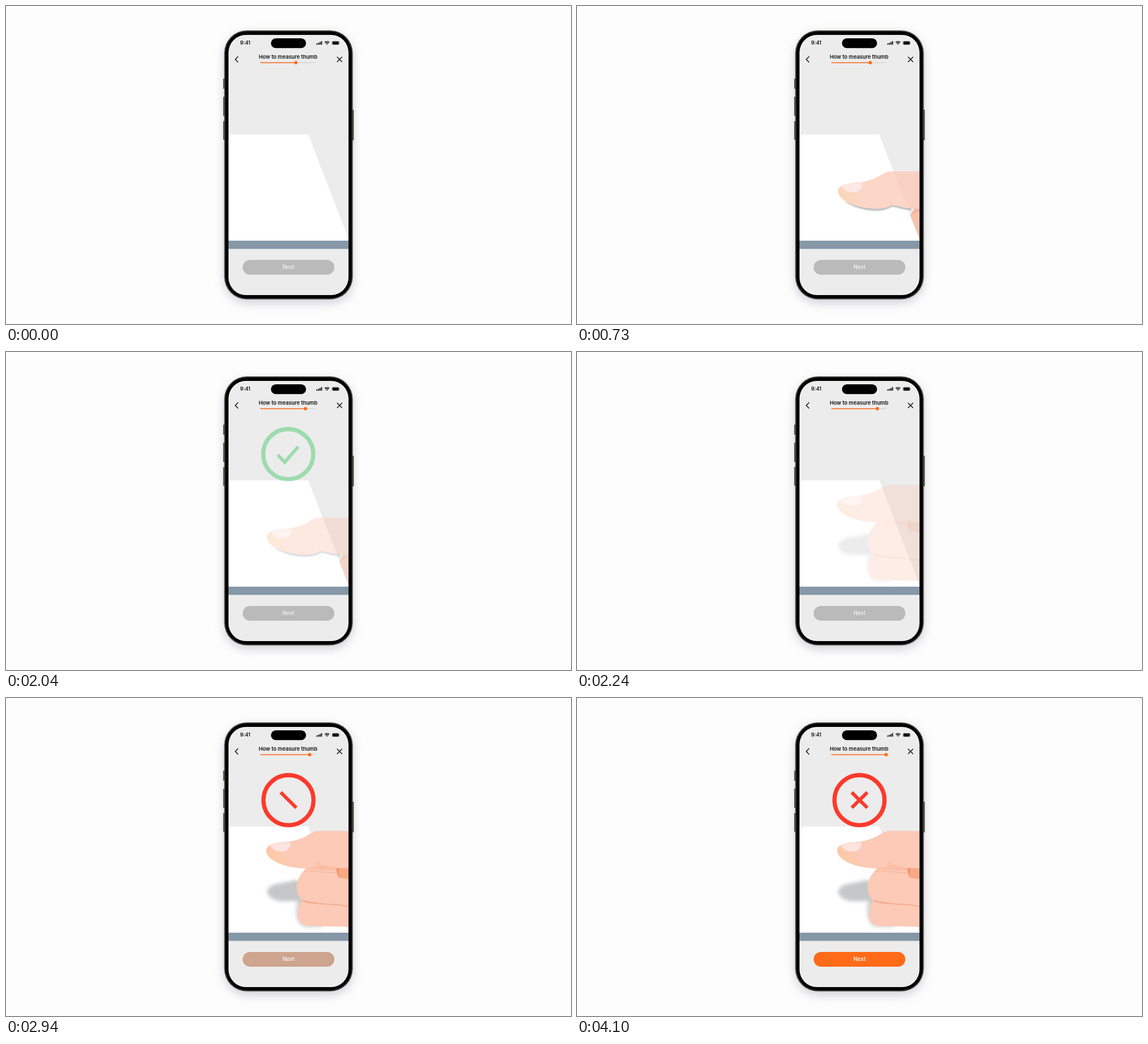
Animation of 998 by 561 pixels, one loop 4130 ms. Source, as an HTML page with a canvas:

```html
<!DOCTYPE html>
<html lang="en">
<head>
<meta charset="utf-8">
<title>How to measure thumb</title>
<style>
  html, body { margin: 0; width: 100%; height: 100%; overflow: hidden; background: #fdfdfd; }
  canvas { display: block; width: 998px; height: 561px; }
</style>
</head>
<body>
<canvas id="stage"></canvas>
<script>
const W = 998, H = 561, LOOP = 4130;
const scale = window.devicePixelRatio || 1;
const ORANGE = '#ff6b18', GREEN = '#2fc256', RED = '#fb3a2d', SKIN = '#fccab6';

function setup(canvas) {
  canvas.width = W * scale;
  canvas.height = H * scale;
  const c = canvas.getContext('2d');
  c.scale(scale, scale);
  return c;
}

function layer(draw) {
  const canvas = document.createElement('canvas');
  draw(setup(canvas));
  return canvas;
}

const ramp = (t, from, to) => Math.min(1, Math.max(0, (t - from) / (to - from)));
const mix = (a, b, k) => `rgb(${a.map((v, i) => Math.round(v + (b[i] - v) * k))})`;

function box(c, x, y, w, h, r, fill) {
  c.beginPath();
  c.roundRect(x, y, w, h, r);
  c.fillStyle = fill;
  c.fill();
}

function shape(c, d, fill) {
  c.fillStyle = fill;
  c.fill(new Path2D(d));
}

function line(c, d, color, width) {
  c.strokeStyle = color;
  c.lineWidth = width;
  c.stroke(new Path2D(d));
}

function label(c, text, x, y, size, weight, color, align = 'center') {
  c.font = `${weight} ${size}px Inter, sans-serif`;
  c.textAlign = align;
  c.fillStyle = color;
  c.fillText(text, x, y);
}

function blurred(c, radius, draw) {
  c.save();
  c.filter = `blur(${radius * scale}px)`;
  draw();
  c.restore();
}

function clipScreen(c) {
  c.beginPath();
  c.roundRect(393, 51, 212, 459, 31);
  c.clip();
}

const THUMB = 'M608 292H553C544 292 537 299 528 303C515 309 503 311 491 312' +
  'C477 313 463 316 461 325C460 333 468 342 479 347C493 354 512 358 529 358' +
  'C540 358 549 356 556 351.5C565 352 578 357 590 357.5L608 358Z';

function drawThumb(c) {
  const skin = c.createLinearGradient(464, 338, 494, 322);
  skin.addColorStop(0, '#fdc9a4');
  skin.addColorStop(1, SKIN);
  shape(c, THUMB, skin);
  shape(c, 'M468 318C478 313 492 313 504 312C505 319 502 324 496 327' +
    'C486 331 474 328 468 318Z', '#fce3df');
  line(c, 'M556 352Q553 350 554 345', '#f7b094', 0.9);
}

const flatHand = layer(c => {
  clipScreen(c);
  blurred(c, 1.5, () => {
    c.translate(0, 1.8);
    shape(c, 'M474 343C490 355 512 359 529 359C541 359 550 356 556 352' +
      'C565 353 578 358 590 358L590 350L500 340Z', 'rgba(45,60,65,.5)');
  });
  shape(c, 'M608 356L597 358C594 362 590 366 589 371L606 413Z', '#fbb79c');
  shape(c, 'M608 356H597C594 362 590 366 589 371Q597 364 608 361Z', '#f8a27e');
  drawThumb(c);
});

const FIST = 'M534 296C526 304 517 314 514 327C512 342 516 351 524 357' +
  'C518 364 516 372 516 382C516 393 521 400 532 402C552 403 580 403 608 404V290Z';

const raisedHand = layer(c => {
  clipScreen(c);
  blurred(c, 3, () => {
    shape(c, 'M462 338C470 324 493 328 510 321L524 326V361' +
      'C505 355 492 362 474 356C466 352 459 345 462 338Z', 'rgba(65,70,75,.3)');
    shape(c, 'M514 360C510 382 513 401 530 404L560 404V350Z', 'rgba(65,70,75,.24)');
  });
  shape(c, FIST, SKIN);
  shape(c, 'M534 296L549 290L608 297V305C585 304 562 306 530 301Z', '#fbbda4');
  shape(c, 'M608 296L583 301Q584 309 588 317L608 320Z', '#f9a884');
  shape(c, 'M583 301L589 300Q587 309 588 317Q584 309 583 301Z', '#f39470');
  line(c, 'M527 306C542 303 555 309 586 308', '#f7ae92', 1.1);
  line(c, 'M523 357C542 366 574 361 608 368', '#f5a486', 1.4);
  line(c, 'M525 357C537 360 546 361 556 363', '#f6a98c', 1.2);
  c.save();
  c.translate(-1.5, -57.5);
  drawThumb(c);
  line(c, 'M551 354Q550 351 552 346', '#f7b094', 0.9);
  c.restore();
});

function drawStatus(c) {
  label(c, '9:41', 413.5, 68.3, 9, 600, '#111', 'left');
  [2.2, 3.4, 4.9, 6.4].forEach((h, i) => box(c, 548 + i * 2.8, 68.3 - h, 1.9, h, 0.5, '#111'));
  c.save();
  c.beginPath();
  c.moveTo(567, 68.6);
  c.lineTo(560.5, 61.8);
  c.lineTo(573.5, 61.8);
  c.clip();
  for (const r of [6, 3.6]) {
    c.beginPath();
    c.arc(567, 68.4, r, 0, Math.PI * 2);
    c.strokeStyle = '#111';
    c.lineWidth = 1.4;
    c.stroke();
  }
  c.beginPath();
  c.arc(567, 68.4, 1.9, 0, Math.PI * 2);
  c.fillStyle = '#111';
  c.fill();
  c.restore();
  box(c, 575.6, 61.7, 13.2, 7, 2.2, '#aaa');
  box(c, 576.6, 62.5, 11.2, 5.4, 1.4, '#111');
  box(c, 589.2, 64.1, 0.8, 2.2, 0.4, '#aaa');
}

const phone = layer(c => {
  c.fillStyle = '#fdfdfd';
  c.fillRect(0, 0, W, H);
  blurred(c, 9, () => box(c, 386, 49, 226, 474, 40, 'rgba(75,75,110,.28)'));
  for (const [x, y, h] of [[383.8, 128, 18], [383.8, 160, 34], [383.8, 203, 33], [611.5, 183, 54]])
    box(c, x, y, 2.7, h, 0.8, '#393936');
  box(c, 385.4, 43, 227.2, 474.6, 40, '#4b4b43');
  box(c, 387, 44.4, 224, 471.8, 38.5, '#1d1d1b');
  box(c, 387.7, 45.2, 222.6, 470.2, 38, '#000');
  c.save();
  clipScreen(c);
  c.fillStyle = '#ececec';
  c.fillRect(393, 51, 212, 459);
  shape(c, 'M393 226.5H534L605 411V414H393Z', '#fff');
  c.fillStyle = '#8698a7';
  c.fillRect(393, 414, 212, 14.5);
  c.restore();
  box(c, 468, 57, 62, 17.3, 8.7, '#000');
  c.beginPath();
  c.arc(520.5, 65.6, 2.4, 0, Math.PI * 2);
  c.fillStyle = '#0c0d18';
  c.fill();
  drawStatus(c);
  line(c, 'M410 89L405 94.2L410 99.4', '#111', 1.5);
  line(c, 'M584.7 89.7L593.7 98.7M593.7 89.7L584.7 98.7', '#111', 1.5);
  label(c, 'How to measure thumb', 498.2, 93.2, 9.25, 600, '#111');
  box(c, 449, 99.2, 97.5, 1.6, 0.8, '#d5d5d5');
});

const ctx = setup(document.getElementById('stage'));

function drawLayer(image, alpha) {
  if (alpha <= 0) return;
  ctx.globalAlpha = alpha;
  ctx.drawImage(image, 0, 0, W, H);
  ctx.globalAlpha = 1;
}

function ring(x, part, color) {
  if (part <= 0) return;
  ctx.beginPath();
  ctx.arc(x, 180.2, 44.2, -Math.PI / 2, -Math.PI / 2 + part * Math.PI * 2);
  ctx.strokeStyle = color;
  ctx.lineWidth = 7.3;
  ctx.stroke();
}

// Strokes the first part of a polyline.
function trace(points, part, color) {
  if (part <= 0) return;
  const dist = (a, b) => Math.hypot(b[0] - a[0], b[1] - a[1]);
  let left = 0;
  for (let i = 1; i < points.length; i++) left += dist(points[i - 1], points[i]);
  left *= part;
  ctx.beginPath();
  ctx.moveTo(...points[0]);
  for (let i = 1; i < points.length && left > 0; i++) {
    const [a, b] = [points[i - 1], points[i]];
    const k = Math.min(1, left / dist(a, b));
    ctx.lineTo(a[0] + (b[0] - a[0]) * k, a[1] + (b[1] - a[1]) * k);
    left -= dist(a, b);
  }
  ctx.strokeStyle = color;
  ctx.lineWidth = 6;
  ctx.stroke();
}

function render(t) {
  drawLayer(phone, 1);

  const leave = 1 - ramp(t, 1870, 2160);
  drawLayer(flatHand, Math.min(ramp(t, 500, 800), leave));
  drawLayer(raisedHand, ramp(t, 2150, 2430));

  ctx.globalAlpha = leave;
  ring(498.5, ramp(t, 1060, 1460), GREEN);
  trace([[480, 181.5], [492.3, 194.5], [516.3, 167]], ramp(t, 1480, 1700), GREEN);
  ctx.globalAlpha = 1;

  ring(499, ramp(t, 2430, 2830), RED);
  trace([[485.3, 166.5], [512.8, 193.7]], ramp(t, 2830, 2935), RED);
  trace([[512.8, 166.5], [485.3, 193.7]], ramp(t, 2945, 3060), RED);

  const dot = 512 + 34 * t / 4100;
  box(ctx, 449, 99.2, dot - 449, 1.6, 0.8, ORANGE);
  ctx.beginPath();
  ctx.arc(dot, 100, 2.9, 0, Math.PI * 2);
  ctx.fill();

  const ready = ramp(t, 2840, 3200);
  box(ctx, 418, 448, 162, 26, 13, mix([186, 186, 186], [255, 107, 24], ready));
  label(ctx, 'Next', 499, 464.4, 9.7, 500, mix([242, 242, 242], [255, 255, 255], ready));
}

function tick() {
  render(performance.now() % LOOP);
  requestAnimationFrame(tick);
}
tick();
</script>
</body>
</html>
```
